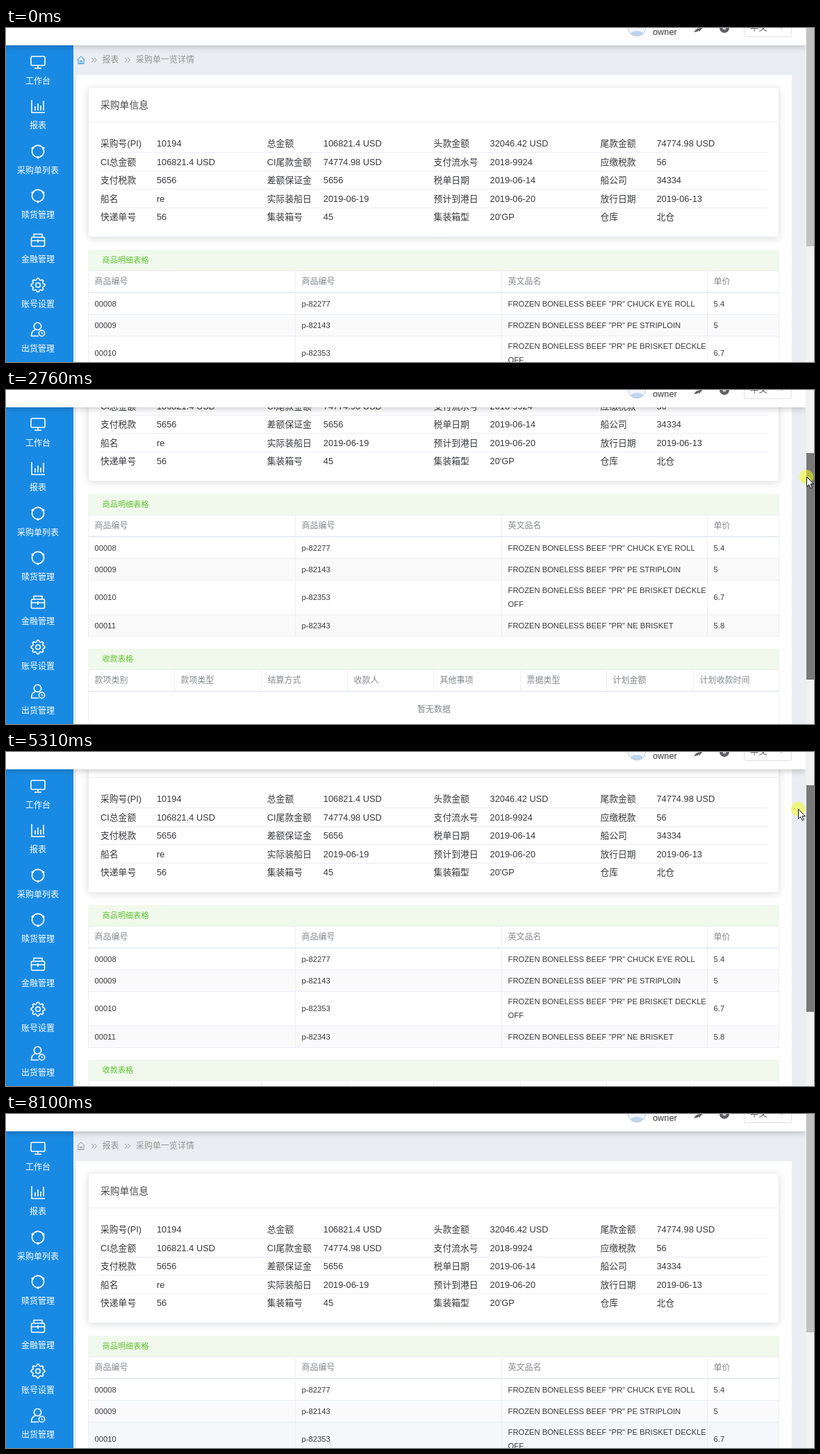
Recreate the animation shown at these times as an HTML page with a canvas. Size 1163x482 px, loop 8400 ms.

```html
<!DOCTYPE html>
<html lang="zh-CN">
<head>
<meta charset="utf-8">
<title>采购单一览详情</title>
<style>
html, body { margin: 0; width: 100%; height: 100%; overflow: hidden; background: #fff; }
canvas { display: block; }
</style>
</head>
<body>
<canvas id="stage" width="1163" height="482"></canvas>
<script>
const H = 482, LOOP = 8400, STEP = 75;
const ctx = document.getElementById('stage').getContext('2d');
const FONT = '"Liberation Sans", "Noto Sans CJK SC", "Noto Sans CJK", sans-serif';
const LINE = '#ebeef5', MUTED = '#84878d', INK = '#37383b', GREEN = '#5fc030', BLUE = '#198ae3';
const LEFT = 118, RIGHT = 1113, ROW = 31, HEADER = 25, SIDEBAR = 97;
const MAX_SCROLL = 296, GRAB_Y = 22.4, THUMB_RATIO = 0.605;
const ENTER = 70, PRESS = 1840, RELEASE = 6780, LEAVE = 7940;

// Pointer moves: start, end, x and y reached
const MOVES = [
  [ENTER, 440, 960, 122], [900, 1520, 1158, 20],
  [PRESS, 1990, 1161, 29.7], [1990, 2760, 1152, 125.3], [2760, 3380, 1149, 209], [3380, 3840, 1149, 255],
  [4090, 4320, 1150, 238], [4540, 5310, 1140, 82.3], [5310, 6240, 1149, 14], [6240, 6550, 1151, 6],
  [7100, LEAVE, 1100, 475]
];

const MENU = ['工作台', '报表', '采购单列表', '赎货管理', '金融管理', '账号设置', '出货管理'];
const INFO = [
  ['采购号(PI)', '10194', '总金额', '106821.4 USD', '头款金额', '32046.42 USD', '尾款金额', '74774.98 USD'],
  ['CI总金额', '106821.4 USD', 'CI尾款金额', '74774.98 USD', '支付流水号', '2018-9924', '应缴税款', '56'],
  ['支付税款', '5656', '差额保证金', '5656', '税单日期', '2019-06-14', '船公司', '34334'],
  ['船名', 're', '实际装船日', '2019-06-19', '预计到港日', '2019-06-20', '放行日期', '2019-06-13'],
  ['快递单号', '56', '集装箱号', '45', '集装箱型', "20'GP", '仓库', '北仓']
];
const GOODS_HEAD = ['商品编号', '商品编号', '英文品名', '单价'];
const GOODS = [
  ['00008', 'p-82277', 'FROZEN BONELESS BEEF "PR" CHUCK EYE ROLL', '5.4'],
  ['00009', 'p-82143', 'FROZEN BONELESS BEEF "PR" PE STRIPLOIN', '5'],
  ['00010', 'p-82353', 'FROZEN BONELESS BEEF "PR" PE BRISKET DECKLE|OFF', '6.7'],
  ['00011', 'p-82343', 'FROZEN BONELESS BEEF "PR" NE BRISKET', '5.8']
];
const RECEIPT = ['款项类别', '款项类型', '结算方式', '收款人', '其他事项', '票据类型', '计划金额', '计划收款时间'];
const PAYMENT = ['款项类别', '款项类型', '结算方式', '结算方式', '付款人', '其他事项', '票据类型', '计划金额', '计划付款时间'];

let nextTop = 382;
const rows = GOODS.map(cells => {
  const top = nextTop;
  nextTop += cells[2].includes('|') ? 50 : ROW;
  return { cells, top, end: nextTop };
});

function rect(x, y, w, h, color) {
  ctx.fillStyle = color;
  ctx.fillRect(x, y, w, h);
}

function round(x, y, w, h, r) {
  ctx.beginPath();
  ctx.roundRect(x, y, w, h, r);
}

// y is the vertical middle of the text
function text(str, x, y, size, color, align = 'left') {
  ctx.font = `${size}px ${FONT}`;
  ctx.fillStyle = color;
  ctx.textAlign = align;
  ctx.fillText(str, x, y + size * 0.36);
}

function stroke(color, width = 1) {
  ctx.strokeStyle = color;
  ctx.lineWidth = width;
  ctx.stroke();
}

function fill(color) {
  ctx.fillStyle = color;
  ctx.fill();
}

function lines(...paths) {
  ctx.beginPath();
  for (const p of paths)
    for (let i = 0; i < p.length; i += 2) i ? ctx.lineTo(p[i], p[i + 1]) : ctx.moveTo(p[i], p[i + 1]);
}

function circle(x, y, r) {
  ctx.beginPath();
  ctx.arc(x, y, r, 0, Math.PI * 2);
}

function disc(x, y, r, color) {
  circle(x, y, r);
  fill(color);
}

function ring(x, y, r, color, width) {
  circle(x, y, r);
  stroke(color, width);
}

function shadow(alpha, blur) {
  ctx.shadowColor = `rgba(0,0,0,${alpha})`;
  ctx.shadowBlur = blur;
  ctx.shadowOffsetY = 2;
}

// The pointer advances in discrete steps and rests between moves
function pointerAt(t) {
  let x = 1092, y = 468;
  for (const [from, to, tx, ty] of MOVES) {
    if (t < from) break;
    const k = t >= to ? 1 : Math.floor((t - from) / STEP) * STEP / (to - from);
    x += (tx - x) * k;
    y += (ty - y) * k;
  }
  return { x, y };
}

function cycleIcon() {
  for (let i = 0; i < 3; i++) {
    const a = -Math.PI / 6 + i * Math.PI * 2 / 3;
    ctx.beginPath();
    ctx.arc(0, 0, 8.6, a + 0.15, a + Math.PI * 2 / 3 - 0.15);
    stroke('#fff', 1.7);
    disc(Math.cos(a) * 8.8, Math.sin(a) * 8.8, 1.8, '#fff');
  }
}

const ICONS = [
  () => {
    round(-10, -8, 20, 13, 1.5); stroke('#fff', 1.6);
    lines([0, 5, 0, 9], [-5, 9, 5, 9]); stroke('#fff', 1.6);
  },
  () => {
    lines([-9, -9, -9, 9, 10, 9], [-4, 0, -4, 6], [0, -4, 0, 6], [4, -1, 4, 6], [8, -8, 8, 6]);
    stroke('#fff', 1.6);
  },
  cycleIcon,
  cycleIcon,
  () => {
    round(-9.5, -4, 19, 13, 1.5); stroke('#fff', 1.6);
    lines([-6, -4, -6, -8.5, 6, -8.5, 6, -4], [-9, 1, 9, 1], [0, -1, 0, 4]); stroke('#fff', 1.6);
  },
  () => {
    ctx.beginPath();
    for (let i = 0; i <= 64; i++) {
      const a = i / 64 * Math.PI * 2;
      const r = 8.8 + 1.1 * Math.tanh(2.5 * Math.cos(a * 8));
      ctx.lineTo(Math.cos(a) * r, Math.sin(a) * r);
    }
    stroke('#fff', 1.6);
    ring(0, 0, 3.3, '#fff', 1.6);
  },
  () => {
    ring(-0.5, -4.5, 5.2, '#fff', 1.6);
    ctx.beginPath();
    ctx.moveTo(1, 9.5);
    ctx.lineTo(-9.5, 9.5);
    ctx.quadraticCurveTo(-9.5, 2, -4, 0.5);
    stroke('#fff', 1.6);
    ring(5.5, 5.5, 4.2, '#fff', 1.4);
    lines([5.5, 3.5, 5.5, 6, 7.5, 6]); stroke('#fff', 1.2);
  }
];

function sidebar() {
  rect(0, HEADER, SIDEBAR, H, BLUE);
  MENU.forEach((label, i) => {
    const y = 49 + i * 64.35;
    ctx.save();
    ctx.translate(46, Math.round(y));
    ICONS[i]();
    ctx.restore();
    text(label, 46, Math.round(y + 28), 12, '#fff', 'center');
  });
}

function header() {
  ctx.save();
  shadow(0.22, 9);
  rect(0, -20, 1151, HEADER + 20, '#fff');
  ctx.restore();

  ctx.save();
  disc(908, -1, 13, '#f3f6fa');
  ctx.clip();
  ctx.beginPath();
  ctx.ellipse(908, 10, 10, 6, 0, 0, Math.PI * 2);
  fill('#bcd5ef');
  ctx.restore();
  ring(908, -1, 12.8, '#c3ccd8', 1);
  text('owner', 931, 5.6, 12.8, INK);

  lines([990, 6, 993, 2, 998, 0, 996, 5]);
  fill('#606266');
  lines([997, 4, 1003, -3]);
  stroke('#606266', 3);
  disc(1034, 0, 7, '#5e6063');
  disc(1034, 0, 2.5, '#d8d9db');

  round(1062.5, -14.5, 68, 27, 3);
  stroke('#dcdfe6');
  text('中文', 1071, -0.5, 12.5, '#606266');
  lines([1112, -3, 1116, 1, 1120, -3]);
  stroke('#c0c4cc', 1.2);
}

function breadcrumb(homeLit) {
  lines([102.5, 46, 108, 40.8, 113.5, 46], [104, 45, 104, 51.5, 112, 51.5, 112, 45]);
  stroke(homeLit ? '#2b93ea' : '#999');
  ctx.strokeRect(106.8, 47.5, 2.4, 4);
  for (const x of [123, 171]) {
    lines([x, 43, x + 3.5, 46.3, x, 49.6], [x + 4, 43, x + 7.5, 46.3, x + 4, 49.6]);
    stroke('#999');
  }
  text('报表', 138.5, 46, 12, '#949494');
  text('采购单一览详情', 187, 46, 12, '#949494');
}

function infoCard() {
  ctx.save();
  shadow(0.13, 11);
  round(LEFT, 85, RIGHT - LEFT, 217, 3);
  fill('#fff');
  ctx.restore();
  round(LEFT + 0.5, 85.5, RIGHT - LEFT - 1, 216, 3);
  stroke(LINE);
  text('采购单信息', 136, 111, 13.8, '#48494c');
  rect(LEFT, 135, RIGHT - LEFT, 1, LINE);
  INFO.forEach((row, r) => {
    const y = 166 + r * 26.55;
    row.forEach((str, c) => text(str, 136 + (c >> 1) * 239.8 + (c % 2) * 81, Math.round(y), 12.8, INK));
    if (r < 4) rect(136, Math.round(y + 13), 960, 1, LINE);
  });
}

// Equal columns counted back from the last one; the first takes the remainder
function columns(count, last, step) {
  return Array.from({ length: count }, (_, i) => i ? Math.round(last - (count - 1 - i) * step) : LEFT);
}

function columnLines(edges, y, h) {
  for (const x of [...edges, RIGHT - 1]) rect(x, y, 1, h, LINE);
}

function tableTop(title, y, heads, edges) {
  round(LEFT, y, RIGHT - LEFT, 31, 3);
  fill('#f0f9eb');
  text(title, 138.5, y + 15, 11.2, GREEN);
  rect(LEFT, y + 30, RIGHT - LEFT, 32, '#fff');
  rect(LEFT, y + 30, RIGHT - LEFT, 1, LINE);
  heads.forEach((str, i) => text(str, edges[i] + 9.5, y + 46, 12, MUTED));
  columnLines(edges, y + 31, 31);
  rect(LEFT, y + 61, RIGHT - LEFT, 1.5, '#e2e7ef');
}

function goodsTable(hoverRow) {
  const edges = columns(4, 1009, 296.5);
  tableTop('商品明细表格', 320, GOODS_HEAD, edges);
  rows.forEach(({ cells, top, end }, r) => {
    const h = end - top;
    if (r === hoverRow) rect(LEFT, top + 1, RIGHT - LEFT, h, '#f5f7fa');
    else if (r % 2) rect(LEFT, top + 1, RIGHT - LEFT, h, '#fafafa');
    cells.forEach((str, c) => {
      const parts = str.split('|');
      parts.forEach((part, i) =>
        text(part, edges[c] + 9.6, top + h / 2 + (i - (parts.length - 1) / 2) * 19.6, 11.2, INK));
    });
    columnLines(edges, top + 1, h);
    rect(LEFT, end, RIGHT - LEFT, 1, LINE);
  });
}

function emptyTable(title, y, heads, edges) {
  tableTop(title, y, heads, edges);
  text('暂无数据', 616, y + 88, 12, MUTED, 'center');
  columnLines([LEFT], y + 62, 52);
  rect(LEFT, y + 114, RIGHT - LEFT, 1, LINE);
}

function page(scroll, homeLit, hoverRow) {
  rect(SIDEBAR, 0, 1151 - SIDEBAR, H, '#eaedf2');
  ctx.save();
  ctx.translate(0, -scroll);
  breadcrumb(homeLit);
  rect(101, 68, 1030, 760, '#fff');
  infoCard();
  goodsTable(hoverRow);
  emptyTable('收款表格', 543, RECEIPT, columns(RECEIPT.length, 988.5, 124.35));
  emptyTable('付款表格', 674, PAYMENT, columns(PAYMENT.length, 1003, 109.7));
  ctx.restore();
}

function scrollbar(scroll, color) {
  rect(1151, 0, 12, H, '#f1f1f1');
  rect(1152, Math.round(scroll * THUMB_RATIO) - 12, 11, 327, color);
}

function pointer({ x, y }) {
  disc(x, y, 10.3, 'rgba(240,252,30,.55)');
  ctx.save();
  ctx.translate(Math.round(x) + 0.5, Math.round(y) + 0.5);
  lines([0, 0, 0, 14, 3.2, 11, 5.6, 16.2, 7.8, 15.2, 5.5, 10.2, 10, 10.2]);
  ctx.closePath();
  fill('#fff');
  stroke('#111');
  ctx.restore();
}

function draw(t) {
  const p = pointerAt(t);
  const visible = t >= ENTER && t < LEAVE;
  const dragging = t >= PRESS && t < RELEASE;
  const wanted = Math.round((p.y - GRAB_Y) / THUMB_RATIO);
  const scroll = dragging ? Math.max(0, Math.min(MAX_SCROLL, wanted)) : 0;
  const overTable = t >= ENTER && !dragging && p.x < RIGHT;
  const hoverRow = overTable ? rows.findIndex(row => p.y >= row.top && p.y < row.end) : -1;

  page(scroll, t < PRESS, hoverRow);
  sidebar();
  header();
  scrollbar(scroll, dragging ? '#787878' : p.x >= 1151 ? '#a8a8a8' : '#c1c1c1');
  if (visible) pointer(p);
}

const start = performance.now();
function tick() {
  draw((performance.now() - start) % LOOP);
  requestAnimationFrame(tick);
}
tick();
</script>
</body>
</html>
```
